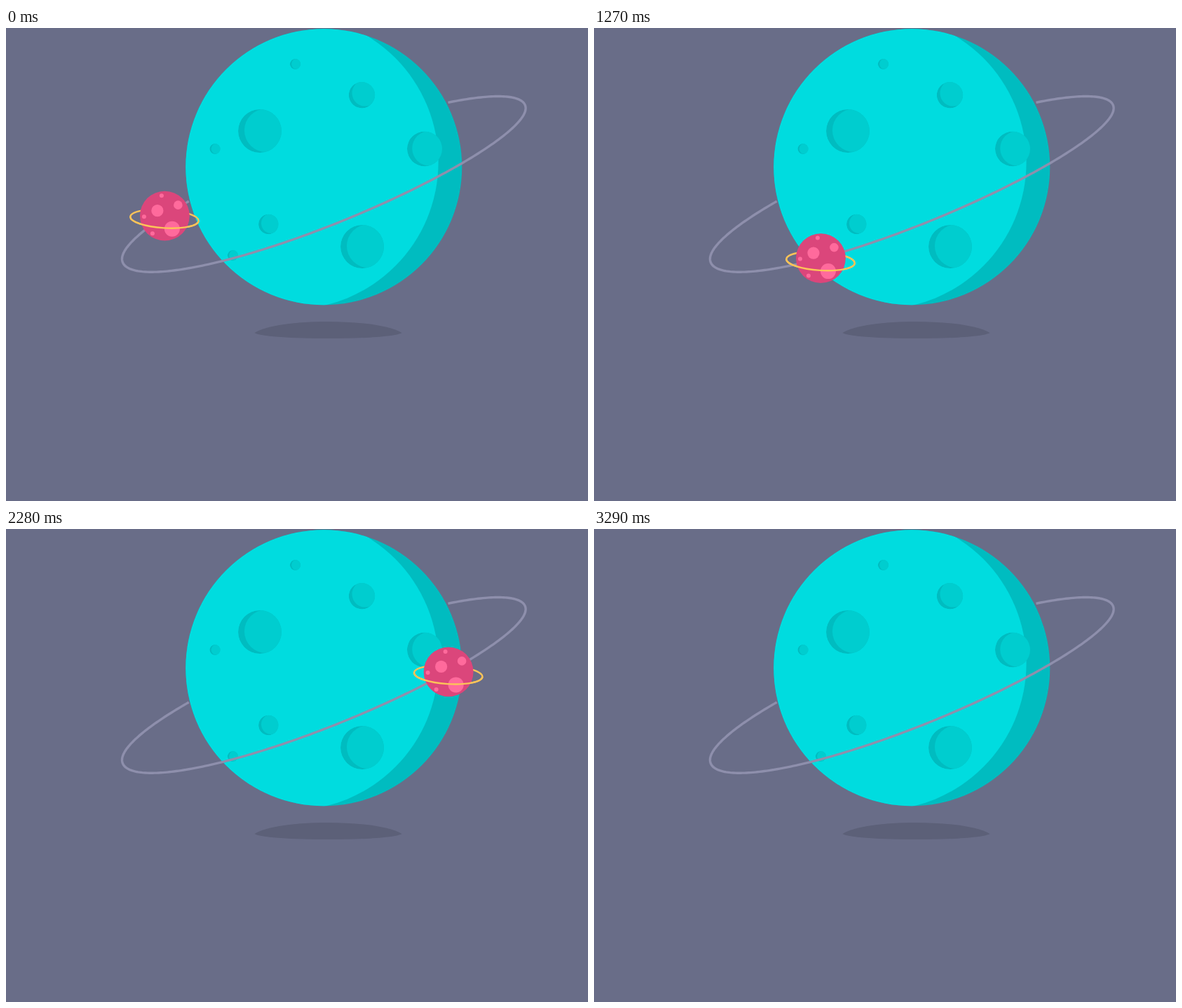
These frames come from a looping animation (830x675 px, 3800 ms). An HTML page:

```html
<!DOCTYPE html>
<html lang="en">
<head>
<meta charset="utf-8">
<title>Orbiting moon</title>
<style>
  html, body { margin: 0; width: 100%; height: 100%; overflow: hidden; background: #696d88; }
  svg { display: block; }
  .ring { fill: none; stroke: #fcc458; stroke-width: 2.4; }
</style>
</head>
<body>
<svg width="830" height="675" viewBox="0 0 830 675">
  <defs>
    <clipPath id="planetClip"><circle cx="453.3" cy="198.3" r="197"/></clipPath>
    <clipPath id="behindClip">
      <path clip-rule="evenodd" d="M0 0H830V675H0Z M256.3 198.3a197 197 0 1 0 394 0a197 197 0 1 0 -394 0Z"/>
    </clipPath>
    <clipPath id="craterClip"><circle r="1"/></clipPath>
    <g id="crater" clip-path="url(#craterClip)">
      <circle r="1" fill="#00bcc0"/>
      <circle cx=".29" cy="-.03" r="1" fill="#00cdcf"/>
    </g>
  </defs>

  <path fill="#5c6078" d="M354.5 435C388 413.6 528 413.6 564.5 435C549 445.8 370 445.8 354.5 435Z"/>

  <circle cx="453.3" cy="198.3" r="197" fill="#00bcc0"/>
  <circle cx="406.4" cy="191.2" r="210.2" fill="#00dcdf" clip-path="url(#planetClip)"/>
  <use href="#crater" transform="translate(362 147) scale(31)"/>
  <use href="#crater" transform="translate(508 312) scale(31)"/>
  <use href="#crater" transform="translate(597 172.5) scale(25)"/>
  <use href="#crater" transform="translate(507.5 95.7) rotate(-25) scale(18.7)"/>
  <use href="#crater" transform="translate(374.3 280) rotate(-12) scale(14.2)"/>
  <use href="#crater" transform="translate(412.5 51.5) scale(7.6)"/>
  <use href="#crater" transform="translate(298 172.5) scale(7.6)"/>
  <use href="#crater" transform="translate(323.5 324.5) scale(7.6)"/>

  <path id="orbit" fill="none" stroke="#8e8fac" stroke-width="3.4"/>

  <g id="moonLayer">
    <g id="moon">
      <ellipse class="ring" rx="48.8" ry="13.2" transform="translate(-.4 4.1) rotate(3.5)"/>
      <circle r="35.4" fill="#db467b"/>
      <g fill="#ff6a9c">
        <circle cx="-10.5" cy="-7.5" r="8.6"/>
        <circle cx="19" cy="-15.5" r="6.3"/>
        <circle cx="10.5" cy="18.5" r="11"/>
        <circle cx="-4.5" cy="-29" r="3"/>
        <circle cx="-29.5" cy="1" r="3"/>
        <circle cx="-17.5" cy="25" r="3"/>
      </g>
      <path class="ring" d="M-48.8 0A48.8 13.2 0 0 0 48.8 0" transform="translate(-.4 4.1) rotate(3.5)"/>
    </g>
  </g>
</svg>
<script>
const LOOP = 3800, HIDE_AT = 3290, BEHIND_FROM = 2800;
const ORBIT_START = -48, ORBIT_END = 232;
const el = id => document.getElementById(id);

// A sheared ellipse whose near side leans slightly more than its far side
function orbitPoint(deg) {
  const a = deg * Math.PI / 180, c = Math.cos(a), s = Math.sin(a);
  const lean = 3.5 * Math.max(0, s) * Math.cos(a - .26);
  return { x: 453.3 - 287.8 * c, y: 222 + 107.5 * c + 62.8 * s + lean };
}

const arc = [];
for (let d = ORBIT_START; d <= ORBIT_END; d++) {
  const p = orbitPoint(d);
  arc.push(`${p.x.toFixed(2)} ${p.y.toFixed(2)}`);
}
el('orbit').setAttribute('d', 'M' + arc.join('L'));

// Distance travelled along the orbit, one entry per degree
const travelled = [0];
for (let d = ORBIT_START; d < 260; d++) {
  const p = orbitPoint(d), q = orbitPoint(d + 1);
  travelled.push(travelled[travelled.length - 1] + Math.hypot(q.x - p.x, q.y - p.y));
}
function distanceAt(deg) {
  const i = Math.floor(deg - ORBIT_START), f = deg - ORBIT_START - i;
  return travelled[i] + f * (travelled[i + 1] - travelled[i]);
}
function degreeAt(distance) {
  const next = travelled.findIndex(d => d >= distance);
  const i = Math.max(0, next - 1);
  return ORBIT_START + i + (distance - travelled[i]) / (travelled[i + 1] - travelled[i]);
}

// Times in ms and the angles reached; speed changes smoothly between them
const poses = [[0, -38], [510, -10.7], [1080, 46.3], [1270, 63.1], [1740, 98.1], [2280, 128.1], [2600, 147.9], [3290, 244]]
  .map(([time, deg]) => ({ time, distance: distanceAt(deg) }));
const speedAfter = i => (poses[i + 1].distance - poses[i].distance) / (poses[i + 1].time - poses[i].time);
poses.forEach((pose, i) => {
  const before = speedAfter(Math.max(0, i - 1)), after = speedAfter(Math.min(i, poses.length - 2));
  pose.speed = 2 * before * after / (before + after);
});

function moonPosition(t) {
  const i = poses.findIndex(p => p.time > t);
  const a = poses[i - 1], b = poses[i];
  const span = b.time - a.time, u = (t - a.time) / span, v = 1 - u;
  const distance = a.distance * v * v * (1 + 2 * u) + b.distance * u * u * (1 + 2 * v)
    + span * u * v * (a.speed * v - b.speed * u);
  return orbitPoint(degreeAt(distance));
}

function draw(t) {
  const layer = el('moonLayer'), visible = t < HIDE_AT;
  layer.setAttribute('visibility', visible ? 'visible' : 'hidden');
  layer.setAttribute('clip-path', t < BEHIND_FROM ? 'none' : 'url(#behindClip)');
  if (!visible) return;
  const { x, y } = moonPosition(t);
  el('moon').setAttribute('transform', `translate(${x.toFixed(2)} ${y.toFixed(2)})`);
}

const start = performance.now();
function tick() {
  draw((performance.now() - start) % LOOP);
  requestAnimationFrame(tick);
}
tick();
</script>
</body>
</html>
```
